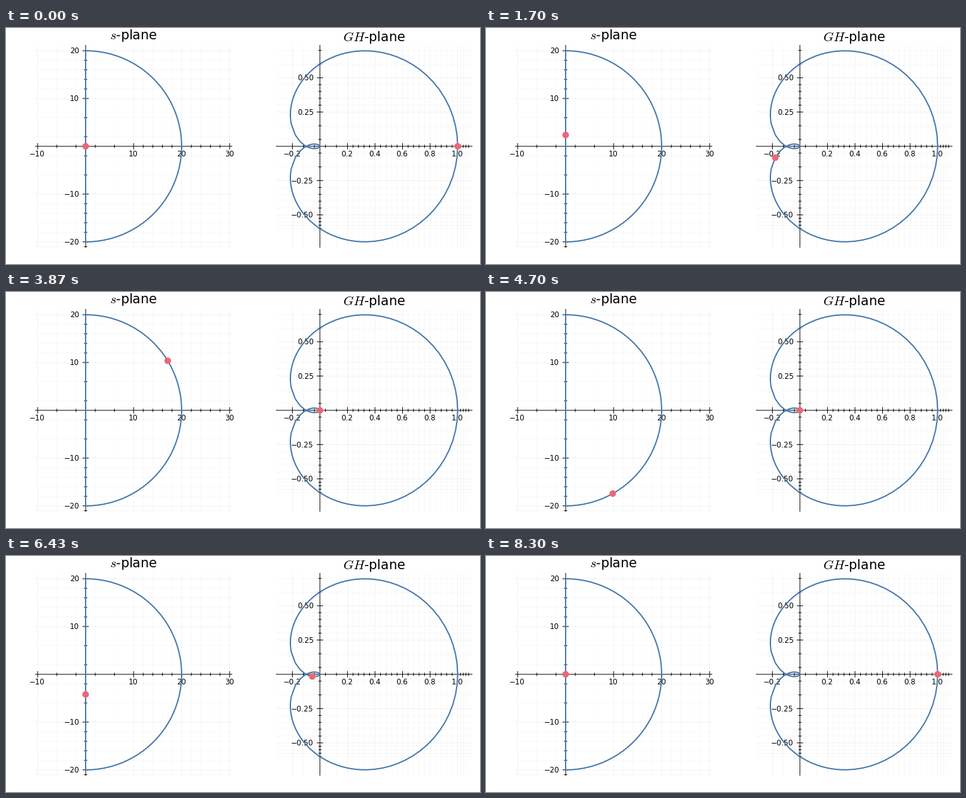
Write a matplotlib script that moves like this. It is 750 by 375 pixels and loops after 8330 ms.

```python
import numpy as np
import matplotlib.pyplot as plt
from matplotlib.animation import FuncAnimation
from matplotlib.patches import Circle

W, H, DPI = 750, 375, 100
FRAMES, INTERVAL = 490, 17
BLUE, PINK = "#4477AA", "#EE6677"
TOP, BOTTOM, AXIS_Y = 27, 349, 188

plt.rcParams["font.family"] = "DejaVu Sans"
plt.rcParams["mathtext.fontset"] = "cm"


def px(n):
    """Pixels to points."""
    return n * 72 / DPI


def transfer(s):
    return 6 / ((s + 1) * (s + 2) * (s + 3))


def contour(n=50, r=20, knee=2):
    """Closed path up the imaginary axis and back round the right half plane."""
    slow = 1j * np.linspace(0, knee, n)
    fast = 1j * np.linspace(knee, r, n)
    arc = r * np.exp(1j * np.linspace(np.pi / 2, -np.pi / 2, n))
    return np.concatenate([slow, fast, arc, -fast[::-1], -slow[::-1]])


def minor_ticks(ticks, parts=5):
    """Split every gap, plus one extrapolated gap at each end."""
    ratio = (ticks[2] - ticks[1]) / (ticks[1] - ticks[0])
    first = ticks[0] - (ticks[1] - ticks[0]) / ratio
    last = ticks[-1] + (ticks[-1] - ticks[-2]) * ratio
    edges = [first, *ticks, last]
    return np.concatenate([np.linspace(a, b, parts + 1)[1:-1]
                           for a, b in zip(edges, edges[1:])])


class Plane:
    def __init__(self, ax, left, right, origin, scale, xticks, yticks,
                 xfmt, yfmt, title, title_y, path):
        self.ax, self.left, self.right = ax, left, right
        self.origin, self.scale = origin, scale

        self.ticks(minor_ticks(xticks), minor_ticks(yticks), 2.5, 0.05)
        self.ticks(xticks, yticks, 5, 0.1)
        self.lines([origin], TOP, BOTTOM, [AXIS_Y], left, right,
                   color="k", lw=px(1), zorder=2)

        for v in xticks:
            self.label(self.x(v) - 0.5, AXIS_Y + 16.4, xfmt, v, "center")
        for v in yticks:
            self.label(origin - 10, self.y(v) + 4.2, yfmt, v, "right")
        ax.text((left + right) / 2 - 0.4, title_y, title, size=px(20.7),
                ha="center", va="baseline")

        self.xs, self.ys = self.x(path.real), self.y(path.imag)
        ax.plot(self.xs, self.ys, color=BLUE, lw=px(2), zorder=4,
                solid_joinstyle="round", solid_capstyle="butt")
        self.dot = ax.add_patch(Circle((0, 0), 5.2, color=PINK, lw=0,
                                       zorder=5))

    def x(self, v):
        return self.origin + self.scale * np.asarray(v)

    def y(self, v):
        return AXIS_Y - self.scale * np.asarray(v)

    def lines(self, x, y0, y1, y, x0, x1, **style):
        self.ax.vlines(x, y0, y1, snap=False, **style)
        self.ax.hlines(y, x0, x1, snap=False, **style)

    def ticks(self, xticks, yticks, size, alpha):
        x, y = self.x(xticks), self.y(yticks)
        x = x[(x >= self.left) & (x <= self.right)]
        y = y[(y >= TOP) & (y <= BOTTOM)]
        self.lines(x, TOP, BOTTOM, y, self.left, self.right,
                   color="k", alpha=alpha, lw=px(0.5), zorder=1)
        self.lines(x, AXIS_Y - size, AXIS_Y + size,
                   y, self.origin - size, self.origin + size,
                   color="k", lw=px(1), zorder=2)

    def label(self, x, y, fmt, value, ha):
        text = format(value, fmt).replace("-", "\u2212")
        self.ax.text(x, y, text, size=px(11.6), ha=ha, va="baseline", zorder=3)

    def move(self, i):
        self.dot.center = self.xs[i], self.ys[i]
        return self.dot


fig = plt.figure(figsize=(W / DPI, H / DPI), dpi=DPI, facecolor="white")
ax = fig.add_axes([0, 0, 1, 1])
ax.set(xlim=(0, W), ylim=(H, 0))
ax.set_autoscale_on(False)
ax.axis("off")

s = contour()
planes = [
    Plane(ax, 46, 358, 126, 7.594, [-10, 10, 20, 30], [-20, -10, 10, 20],
          "d", "d", "$s$-plane", 18, s),
    Plane(ax, 427, 738, 496.75, 217.9, [-0.2, 0.2, 0.4, 0.6, 0.8, 1.0],
          [-0.5, -0.25, 0.25, 0.5], ".1f", ".2f", "$GH$-plane", 21,
          transfer(s)),
]


def update(n):
    # The path is closed, so wrapping lands on the same point.
    i = (n + 1) * len(s) // FRAMES % len(s)
    return [p.move(i) for p in planes]


anim = FuncAnimation(fig, update, frames=FRAMES, interval=INTERVAL,
                     repeat=True, repeat_delay=0, blit=False)
plt.show()
```
